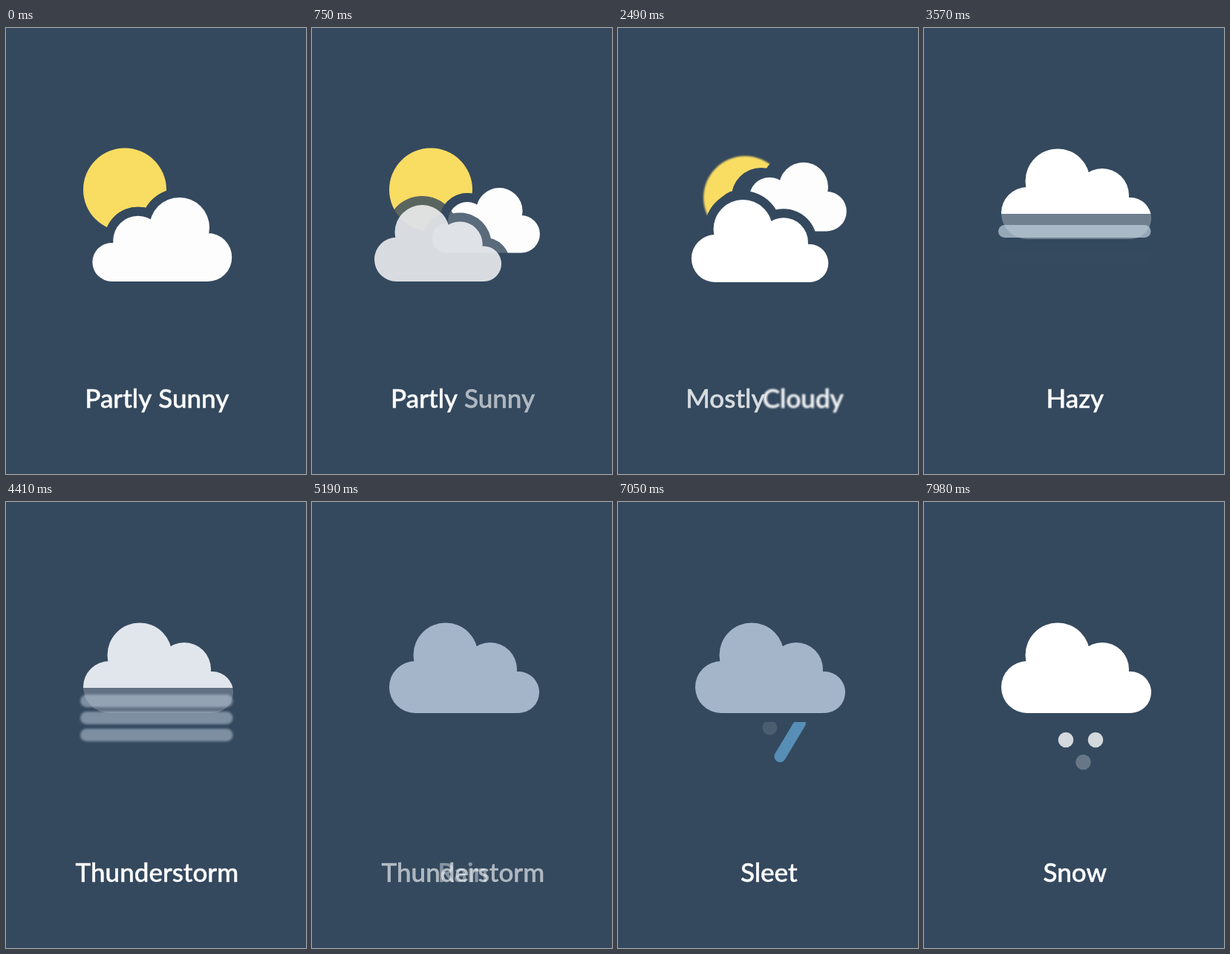
Write an HTML page with a canvas that moves like this. It is 404x600 px and loops after 8 s.

```html
<!DOCTYPE html>
<html lang="en">
<head>
<meta charset="utf-8">
<title>Weather</title>
<style>
  html, body { margin: 0; height: 100%; overflow: hidden; background: #34495e; }
  canvas { display: block; }
</style>
</head>
<body>
<canvas id="stage" width="404" height="600"></canvas>
<script>
const ctx = document.getElementById('stage').getContext('2d');
const BG = '#34495e', SUN = '#f9dc62', BLUE = '#6bb9eb';
const MID = 203.3, GAP = 12;

const lin = (t, a, b) => Math.min(1, Math.max(0, (t - a) / (b - a)));
const inOut = p => p < .5 ? 4 * p ** 3 : 1 - 4 * (1 - p) ** 3;
const ease = (t, a, b) => inOut(lin(t, a, b));
const outBack = (t, a, b) => {
  const q = lin(t, a, b) - 1;
  return 1 + 2.4 * q ** 3 + 1.4 * q ** 2;
};
const mix = (a, b, p) => a + (b - a) * p;

// A pose is [centre x, bottom y, scale]; each step is [start, end, pose].
function track(t, pose, steps) {
  for (const [a, b, next] of steps) {
    const p = outBack(t, a, b);
    pose = pose.map((v, i) => mix(v, next[i], p));
  }
  return pose;
}

function blurred(px, paint) {
  ctx.filter = px ? `blur(${px}px)` : 'none';
  paint();
  ctx.filter = 'none';
}

function cloudShape([x, y, s], flip, grow) {
  const g = grow / s;
  ctx.save();
  ctx.translate(x, y);
  ctx.scale(flip ? -s : s, s);
  ctx.beginPath();
  for (const [cx, cy, r] of [[-25, -78, 43.5], [35, -59, 36], [-66, -35, 35], [73, -28, 28]]) {
    ctx.moveTo(cx + r + g, cy);
    ctx.arc(cx, cy, r + g, 0, 7);
  }
  ctx.rect(-66, -57, 137, 57 + g);
  ctx.fill();
  ctx.restore();
}

function cloud(pose, flip, color, alpha = 1) {
  if (alpha <= 0) return;
  ctx.globalAlpha = alpha;
  ctx.fillStyle = BG;
  cloudShape(pose, flip, GAP);
  ctx.fillStyle = color;
  cloudShape(pose, flip, 0);
  ctx.globalAlpha = 1;
}

function disc(x, y, r, color, alpha = 1) {
  ctx.globalAlpha = alpha;
  ctx.fillStyle = color;
  ctx.beginPath();
  ctx.arc(x, y, r, 0, 7);
  ctx.fill();
  ctx.globalAlpha = 1;
}

function line(x1, y1, x2, y2, width, color, alpha) {
  ctx.globalAlpha = alpha;
  ctx.strokeStyle = color;
  ctx.lineWidth = width;
  ctx.lineCap = 'round';
  ctx.beginPath();
  ctx.moveTo(x1, y1);
  ctx.lineTo(x2, y2);
  ctx.stroke();
  ctx.globalAlpha = 1;
}

function sky(t) {
  const back = track(t, [210.3, 341, .93], [
    [630, 1230, [246, 283.5, .616]],
    [1500, 1830, [231, 273.5, .76]],
    [2490, 2850, [215, 265, .93]],
    [3120, 3480, [205, 284, .8]]
  ]);
  const front = track(t, [140, 341, .847], [
    [630, 1230, [184, 341, .847]],
    [1500, 1830, [191, 342, .912]],
    [2490, 2850, [199, 342, 1]],
    [3120, 3480, [205, 284, 1]]
  ]);
  if (t < 2850) {
    // The sun sinks while the gap around the back cloud slides over it.
    const p = ease(t, 2280, 2850);
    blurred(p && 1.2, () => disc(160 + 55 * p, 217.5 + 53 * p, 56, SUN));
    ctx.fillStyle = BG;
    cloudShape([back[0] - 55 * p, back[1], back[2]], true, GAP + 5 * p);
  }
  if (t < 3480) cloud(back, true, '#fdfdfd', 1 - lin(t, 3120, 3400));

  const grey = lin(t, 4200, 4830) - lin(t, 7440, 7940);
  const color = `rgb(${mix(255, 164, grey)},${mix(255, 181, grey)},${mix(255, 201, grey)})`;
  const low = 1 - lin(t, 3390, 3650) + lin(t, 4200, 4830) ** 1.25;

  // The part of the cloud below y = 250 dissolves into haze.
  for (const [y, h, alpha] of [[0, 250, 1], [250, 350, low]]) {
    ctx.save();
    ctx.beginPath();
    ctx.rect(0, y, 404, h);
    ctx.clip();
    cloud(front, false, color, alpha * lin(t, 630, 780));
    ctx.restore();
  }
}

function haze(t) {
  if (t < 3450 || t > 4630) return;
  const out = lin(t, 4200, 4630);
  blurred(3 * out, () => {
    for (let i = 0; i < 3; i++) {
      const p = lin(t, 3450 + 120 * i, 3630 + 120 * i);
      const y = 267.5 + 23 * i + 18 * (1 - p);
      line(108.5, y, 297, y, 17, '#c6d5e4', p * (1 - out));
    }
  });
}

// Falls into place from behind the cloud, then falls away.
function fall(t, i, inAt, inFor, outAt, outFor, dots) {
  const p = lin(t, inAt, inAt + inFor), q = lin(t, outAt, outAt + outFor);
  const alpha = p * (1 - q);
  if (!alpha) return;
  const d = -60 * (1 - p) ** 2 + 28 * q;
  const x = 165 + 37.5 * i - .6 * d, y = 306 + d;
  if (dots) {
    disc(x - 1, y + 3, 10, '#fff', alpha);
    disc(x - 26, y + 44, 10, '#fff', alpha);
  } else line(x, y, x - 27, y + 45, 15.5, BLUE, alpha);
}

function rainfall(t) {
  ctx.save();
  ctx.beginPath();
  ctx.rect(0, 296, 404, 150);
  ctx.clip();
  for (let i = 0; i < 3; i++) {
    const k = 2 - i, mixed = i === 1;
    fall(t, i, 5330 + 130 * i, 260, 5880 + 130 * k, 130);
    fall(t, i, 6140 + 100 * k, 140, 6630 + 130 * k, 130, mixed);
    fall(t, i, 6890 + 130 * k, 260, 7440 + 60 * k, 130, mixed);
  }
  ctx.restore();
  for (const [x, y, at] of [[191, 320, 7743], [231, 320, 7743], [214.5, 350, 7905]])
    disc(x, y, 10.3, '#fff', lin(t, at, at + 300));
}

const width = s => ctx.measureText(s).width;

// Left edge of the text after `lead` inside a centred label.
const place = (label, lead = '') => MID - width(label) / 2 + width(lead);

function word(text, x, alpha) {
  if (alpha <= 0) return;
  ctx.globalAlpha = alpha;
  ctx.fillText(text, x, 511);
  ctx.strokeText(text, x, 511);
  ctx.globalAlpha = 1;
}

function labels(t) {
  ctx.fillStyle = ctx.strokeStyle = '#fff';
  ctx.lineWidth = .5;
  ctx.font = '500 35px Lato, "Open Sans", sans-serif';
  const a = ease(t, 630, 1230), b = ease(t, 1500, 1830), c = ease(t, 2280, 2850);
  const lead = mix(mix(place('Partly Sunny'), place('Partly Cloudy'), a), place('Mostly Cloudy'), b);
  const tail = mix(place('Partly Cloudy', 'Partly '), place('Mostly Cloudy', 'Mostly '), b);
  word('Partly', lead, 1 - b);
  word('Mostly', lead, b - c);
  word('Sunny', lead + width('Partly '), 1 - lin(t, 630, 930));
  blurred(c > 0 && c < 1 && 1, () =>
    word('Cloudy', mix(tail, place('Cloudy'), c), lin(t, 750, 1100) - lin(t, 3120, 3420)));

  const singles = [['Hazy', 3120, 300], ['Thunderstorm', 4200, 200], ['Rain', 5070, 300],
                   ['Sleet', 5880, 300], ['Snow', 7440, 300]];
  singles.forEach(([text, at, d], i) => {
    const [, end, e] = singles[i + 1] || ['', 9000, 1];
    word(text, place(text), lin(t, at, at + d) - lin(t, end, end + e));
  });
}

function draw(now) {
  const t = now % 8000;
  ctx.fillStyle = BG;
  ctx.fillRect(0, 0, 404, 600);
  sky(t);
  haze(t);
  rainfall(t);
  labels(t);
  requestAnimationFrame(draw);
}
requestAnimationFrame(draw);
</script>
</body>
</html>
```
